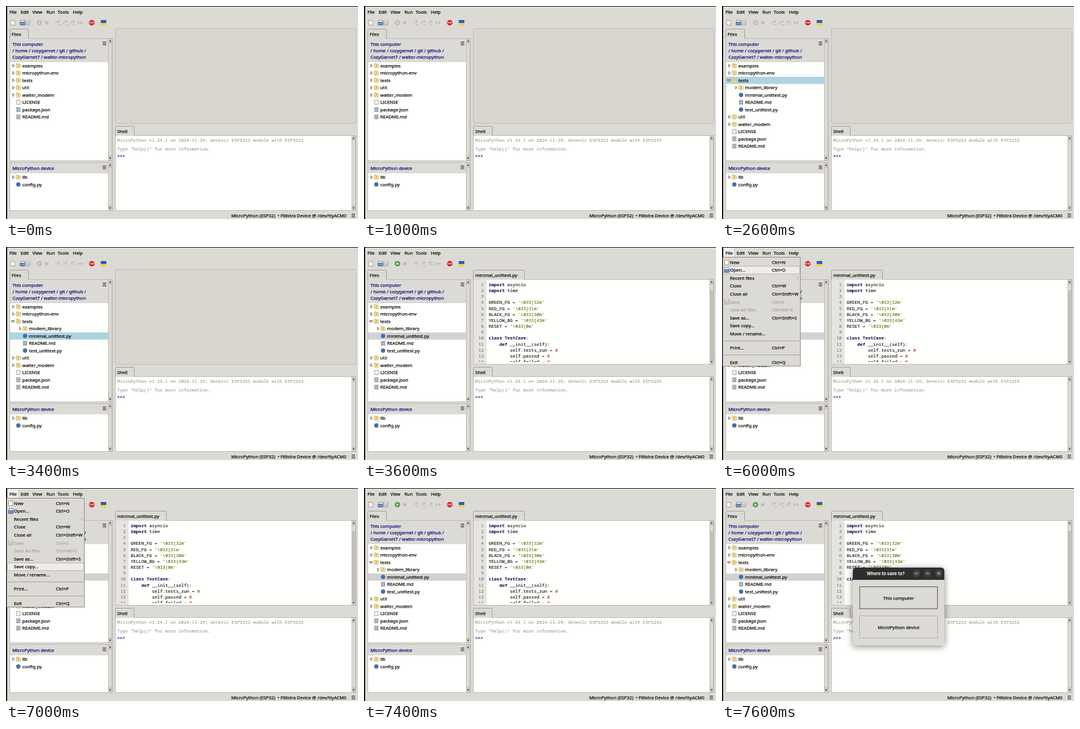
Animation, 600 px wide and 364 px high, one loop 8000 ms. Source, as an HTML page:

```html
<!DOCTYPE html>
<html lang="en">
<head>
<meta charset="utf-8">
<title>Editor walkthrough</title>
<style>
html, body { margin: 0; width: 100%; height: 100%; overflow: hidden; background: #dcdad5; }
svg { display: block; }
text { font: 500 7.75px "Noto Sans", sans-serif; white-space: pre; color: #0c0c0c; fill: currentColor; stroke: currentColor; stroke-width: .25; }
.link { color: #0b0b78; }
.off { color: #aaa69f; }
.mono { font: 7.57px "Noto Sans Mono", monospace; stroke-width: .12; }
.info { color: #999; }
.prompt { color: #2c1285; font-weight: 700; }
.line { color: #777; text-anchor: end; }
.kw { color: #1c1c58; font-weight: 700; }
.str { color: #5f6f00; }
.num { color: #b04600; }
.mid { text-anchor: middle; }
.title { font: 700 7.4px Inter, sans-serif; color: #fff; stroke: none; text-anchor: middle; }
.stop { font-size: 3.2px; font-weight: 700; color: #fff; stroke: none; text-anchor: middle; }
</style>
</head>
<body>
<svg id="stage" width="600" height="364" viewBox="0 0 600 364"></svg>
<script>
const LOOP = 8000, BG = '#dcdad5', EDGE = '#a39f97', SOFT = '#bfbbb4', PAPER = '#fffffd';

const rect = (x, y, w, h, fill, stroke = 'none', rx = 0) =>
  `<rect x="${x}" y="${y}" width="${w}" height="${h}" fill="${fill}" stroke="${stroke}" rx="${rx}"/>`;
const box = (x, y, w, h, fill = BG, stroke = EDGE, rx = 0) => rect(x + .5, y + .5, w - 1, h - 1, fill, stroke, rx);
const path = (d, fill, stroke = 'none', w = 1) => `<path d="${d}" fill="${fill}" stroke="${stroke}" stroke-width="${w}"/>`;
const dot = (x, y, r, fill) => `<circle cx="${x}" cy="${y}" r="${r}" fill="${fill}"/>`;
// y is the middle of the line
const text = (x, y, s, cls = '') => `<text x="${x}" y="${y + 2.8}" class="${cls}">${s}</text>`;
const during = (from, to, s) => `<g data-from="${from}" data-to="${to}">${s}</g>`;

const burger = (x, y) => path([-2.5, 0, 2.5].map(d => `M${x - 3} ${y + d}h6`).join(''), 'none', '#222', 1);

function scrollbar(x, y, h, thumbY = y + 7, thumbH = h - 14) {
  const m = x + 3.5, b = y + h;
  return rect(x, y, 7, h, '#c4c0b8') + box(x, y, 7, 7, BG, SOFT) + box(x, b - 7, 7, 7, BG, SOFT) + box(x, thumbY, 7, thumbH, BG, SOFT) +
    path(`M${m - 2} ${y + 4.7}l2 -2.4l2 2.4zM${m - 2} ${b - 4.7}l2 2.4l2 -2.4z`, '#222');
}

const tab = (x, y, w, label) =>
  path(`M${x + .5} ${y + 17}V${y + 1.5}q0 -1 1 -1H${x + w - 1.5}q1 0 1 1V${y + 17}`, BG, EDGE) +
  text(x + 3.5, y + 8.7, label) +
  path(`M${x + w - 6} ${y + 5}l2.4 2.4m0 -2.4l-2.4 2.4`, 'none', '#c6c2bb', .6);

const page = (x, y, fill = '#fff') => box(x - 3.5, y - 4, 7, 8, fill, '#999');

const icons = {
  dir: (x, y) => rect(x - 4, y - 4, 4, 2, '#d3b968') + rect(x - 3.7, y - 3, 7.4, 6.6, '#f0dd9c', '#d8c27c', 1) +
    path(`M${x - .8} ${y + 2}l1.8 -4`, 'none', '#a98a3a', .9),
  py: (x, y) => dot(x, y, 3.7, '#3e74a5'),
  file: (x, y) => page(x, y),
  doc: (x, y) => page(x, y, '#dde6ec') + path([-2, 0, 2].map(d => `M${x - 2.5} ${y + d}h5`).join(''), 'none', '#5b7f9d', .9)
};

function row(y, level, kind, name, open) {
  const x = 21 + level * 11.5, a = x - 9.5;
  const arrow = kind != 'dir' ? '' : open
    ? path(`M${a - 2.5} ${y - 1}h5.5l-2.75 3z`, '#fff', '#333', .9)
    : path(`M${a} ${y - 2.5}v5l3 -2.5z`, '#fff', '#444', .8);
  return arrow + icons[kind](x, y) + text(x + 6.8, y, name);
}

const rows = (y, list) => list.map((r, i) => row(y + i * 12.5, ...r)).join('');
const select = (y, fill) => rect(7, y - 6, 167, 12.3, fill);

const head = [[0, 'dir', 'examples'], [0, 'dir', 'micropython-env']];
const inside = [[1, 'dir', 'modem_library'], [1, 'py', 'minimal_unittest.py'], [1, 'doc', 'README.md'], [1, 'py', 'test_unittest.py']];
const rest = [[0, 'dir', 'util'], [0, 'dir', 'walter_modem'], [0, 'file', 'LICENSE'], [0, 'doc', 'package.json'], [0, 'doc', 'README.md']];

const newIcon = (x, y) => box(x - 4, y - 4.5, 8, 9, '#fff', '#999') + dot(x + 2.5, y - 3, 1.6, '#f2d23c');
const openIcon = (x, y) => rect(x - 3, y - 4, 7, 5, '#fff', '#8a8a8a') + rect(x - 4, y - 1, 8.5, 5, '#7391c6', '#49669d', .8);
const saveIcon = (x, y) => rect(x - 4, y - 4, 8, 8, '#c9c6c0', '#b3afa8', 1) + rect(x - 2, y - 4, 4, 3, '#e0ded9');
const runIcon = (x, y, fill, mark) => dot(x, y, 4.6, fill) + path(`M${x - 1.5} ${y - 2.6}v5.2l4 -2.6z`, mark);

function toolbar() {
  const y = 28.5, pale = '#c2beb7';
  const step = (x, down) => path(`M${x - 4} ${y + 2}q0 -4 4 -4h2m-2 -2l2.5 2l-2.5 2`, 'none', pale, 1.3) + rect(x - 1, y + down, 5, 1.4, pale);
  return newIcon(11.5, y) + openIcon(28, y) + saveIcon(37, y) + runIcon(57, y, pale, BG) +
    dot(69.5, y, 2.8, pale) + path(`M66 ${y - 3}l7 6m0 -6l-7 6M65.5 ${y}h8`, 'none', pale, .7) +
    step(89, 2.5) + step(102, 3.2) + step(114, 1.8) + path(`M122.5 ${y - 3}v6l4 -3zM127 ${y - 3}v6l4.5 -3z`, pale) +
    path(`M144.3 ${y - 4.5}h3.8l2.7 2.7v3.6l-2.7 2.7h-3.8l-2.7 -2.7v-3.6z`, '#d3222a') +
    `<text x="146.2" y="${y + 1.2}" class="stop">STOP</text>` +
    rect(161.5, y - 4.5, 9.5, 5, '#2b5cb8') + rect(161.5, y + .5, 9.5, 4.2, '#f0d43a');
}

const code = [
  'k:import| asyncio', 'k:import| time', '',
  "GREEN_FG = |s:'\\033[32m'", "RED_FG = |s:'\\033[31m'", "BLACK_FG = |s:'\\033[30m'",
  "YELLOW_BG = |s:'\\033[43m'", "RESET = |s:'\\033[0m'", '',
  'k:class| |k:TestCase|:', '    |k:def| __init__(self):', '        self.tests_run = |n:0',
  '        self.passed = |n:0', '        self.failed = |n:0'
];
const paint = line => line.split('|').map(part => {
  const m = part.match(/^([ksn]):(.+)/);
  return m ? `<tspan class="${{ k: 'kw', s: 'str', n: 'num' }[m[1]]}">${m[2]}</tspan>` : part;
}).join('');

function editor() {
  const lines = code.map((line, i) => {
    const y = 64 + i * 10.18;
    return text(204, y, i + 1, 'mono line') + text(212.5, y, paint(line), 'mono');
  }).join('');
  return rect(186, 38, 412, 19, BG) + box(186, 55, 411, 146, PAPER, SOFT) + tab(186, 39, 88, 'minimal_unittest.py') +
    rect(187, 56, 22, 144, '#e5e4e1') +
    `<svg x="187" y="56" width="402" height="140.5" viewBox="187 56 402 140.5">${lines}</svg>` +
    scrollbar(589, 56, 144, 63, 12);
}

const menuItems = [
  [26, 'New', 'Ctrl+N'], [39.5, 'Open...', 'Ctrl+O'], [53, 'Recent files', ''], [66.5, 'Close', 'Ctrl+W'],
  [80, 'Close all', 'Ctrl+Shift+W'], [93.7, 'Save', 'Ctrl+S', 'off'], [107.3, 'Save All files', 'Ctrl+Alt+S', 'off'],
  [121, 'Save as...', 'Ctrl+Shift+S'], [134.6, 'Save copy...', ''], [148.2, 'Move / rename...', ''],
  [172.5, 'Print...', 'Ctrl+P'], [197, 'Exit', 'Ctrl+Q']
];
const hover = (from, to, y) => during(from, to, box(2, y - 7, 131, 14, '#efede9', '#b9b5ad'));
const fileHover = box(3, 1, 18, 17, '#efede9', '#e4e1dc');

function menu() {
  return box(1, 17, 133, 187, BG, '#8f8b84') +
    hover(5200, 6000, 26) + hover(6000, 6200, 39.5) + hover(6200, 6600, 80) + hover(6800, 7000, 121) + hover(7000, 7400, 134.6) +
    path('M3 160.5h129M3 184.5h129', 'none', EDGE) +
    newIcon(8, 26) + openIcon(8, 39.5) + saveIcon(8, 93.7) + path('M128 51v4l3 -2z', '#f3f1ee', '#8f8b84', .5) +
    menuItems.map(([y, name, key, cls]) => text(13.5, y, name, cls) + text(85, y, key, cls)).join('');
}

function dialog() {
  const knob = (x, d) => dot(x, 146, 6.2, '#444') + path(`M${x} 146` + d, 'none', '#eee', 1);
  return `<g style="filter:drop-shadow(0 2px 6px #0007)">${path('M223 269V142q0 -6 6 -6H373q6 0 6 6V269z', BG)}</g>` +
    path('M223 157V142q0 -6 6 -6H373q6 0 6 6V157z', '#2e2e2e') +
    `<text x="279" y="148.6" class="title">Where to save to?</text>` +
    knob(331.5, 'm-2.5 -1.2l2.5 2.5l2.5 -2.5') + knob(350.5, 'm-2.5 1.2l2.5 -2.5l2.5 2.5') + knob(369.5, 'm-2.2 -2.2l4.4 4.4m0 -4.4l-4.4 4.4') +
    box(234, 168, 134, 39, BG, '#77736c') + box(235, 169, 132, 37, BG, '#b8b4ac') + box(234, 218, 134, 39, BG, '#b3afa7') +
    text(301, 187.7, 'This computer', 'mid') + text(301, 238, 'MicroPython device', 'mid');
}

const menuBar = [[6, 'File'], [25, 'Edit'], [45, 'View'], [69, 'Run'], [88, 'Tools'], [114, 'Help']];
const underline = (x, y, w) => rect(x, y, w, .8, '#0b0b78');

const stage = document.getElementById('stage');
stage.innerHTML =
  rect(0, 0, 600, 364, BG) + rect(0, 0, 2, 364, '#111') + rect(0, 0, 600, 1, '#111') +
  during(4800, 7400, fileHover) + menuBar.map(([x, s]) => text(x, 10, s)).join('') +
  toolbar() + during(3600, LOOP, runIcon(57, 28.5, '#4c9a3f', '#fff')) +
  // file browser
  box(6, 55, 176, 210, BG, SOFT) + tab(6, 39, 33, 'Files') + rect(7, 96, 167, 168, PAPER) + scrollbar(174, 56, 208) + burger(167.8, 64) +
  text(11, 65, 'This computer', 'link') + text(11, 76, '/ home / cozygarnet / git / github /', 'link') +
  text(11, 87, 'CozyGarnet7 / walter-micropython', 'link') +
  during(400, 1000, underline(64.5, 90, 73)) + during(4400, 4600, underline(44, 79, 40)) +
  during(2600, 3400, select(127, '#add5e1')) + during(3400, 3600, select(152, '#add5e1')) + during(3600, LOOP, select(152, '#d2d1d3')) +
  during(0, 2600, rows(102, [...head, [0, 'dir', 'tests'], ...rest])) +
  during(2600, LOOP, rows(102, [...head, [0, 'dir', 'tests', true], ...inside, ...rest])) +
  // device browser
  box(6, 267, 176, 83, BG, SOFT) + rect(7, 286, 167, 63, PAPER) + scrollbar(174, 268, 81) + burger(167.8, 275.7) +
  text(11, 277.5, 'MicroPython device', 'link') + rows(292.5, [[0, 'dir', 'lib'], [0, 'py', 'config.py']]) +
  // editor and shell
  during(0, 3600, box(186, 38, 411, 163, '#d9d6d0', SOFT, 1)) + during(3600, LOOP, editor()) +
  box(186, 221, 411, 129, PAPER, SOFT) + tab(186, 205, 33, 'Shell') + scrollbar(589, 222, 127) +
  text(189.5, 229, 'MicroPython v1.24.1 on 2024-11-29; Generic ESP32S3 module with ESP32S3', 'mono info') +
  text(189.5, 243.7, 'Type "help()" for more information.', 'mono info') +
  text(189.5, 256.5, '&gt;&gt;&gt;', 'mono prompt') +
  text(384, 358, 'MicroPython (ESP32)  • Fillistra Device @ /dev/ttyACM0') + burger(592, 358) +
  during(5200, 7400, menu()) + during(7600, LOOP, dialog());

const timed = [...stage.querySelectorAll('[data-from]')];
function frame() {
  const t = performance.now() % LOOP;
  for (const g of timed) g.style.display = t >= +g.dataset.from && t < +g.dataset.to ? '' : 'none';
  requestAnimationFrame(frame);
}
frame();
</script>
</body>
</html>
```
